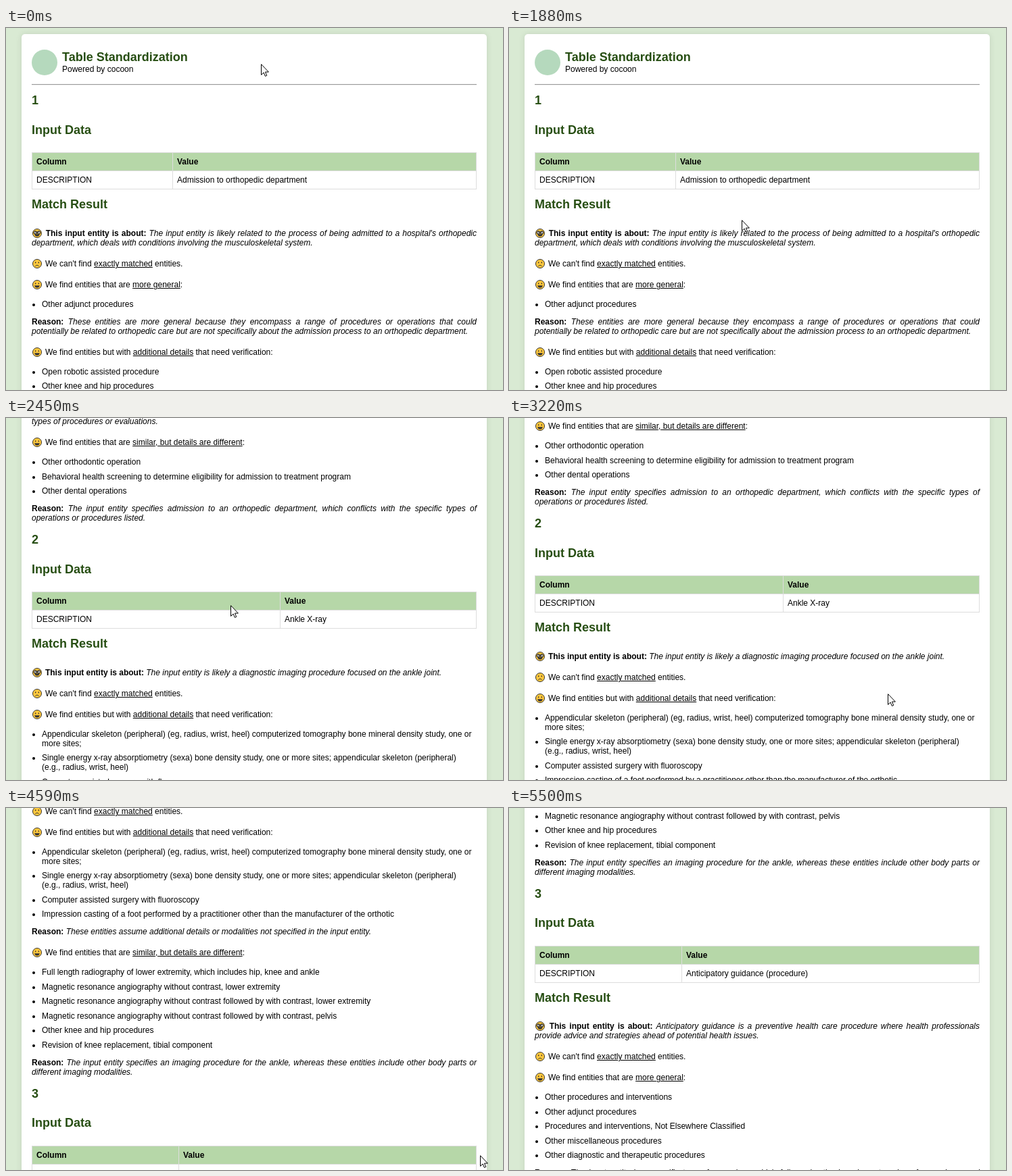
Write an HTML page that moves like this. It is 735 px wide and 536 px high and loops after 5.76 s.

```html
<!DOCTYPE html>
<html lang="en">
<head>
<meta charset="utf-8">
<title>Table Standardization</title>
<style>
  html, body { margin: 0; width: 100%; height: 100%; overflow: hidden; }
  body {
    position: relative; background: #d9ead3; color: #000;
    font: 12px/14px "Liberation Sans", Arial, sans-serif;
  }
  #doc { position: absolute; left: 0; top: 0; width: 735px; height: 2000px; }
  #card {
    position: absolute; left: 23px; top: 9px; width: 688px; height: 1980px;
    background: #fff; border-radius: 5px; box-shadow: 0 0 10px rgba(0, 0, 0, .1);
  }
  #logo {
    position: absolute; left: 38px; top: 32px; width: 38px; height: 38px;
    border-radius: 50%; background: #b5d9bd;
  }
  #rule {
    position: absolute; left: 38px; top: 83px; width: 658px; height: 1px;
    background: #9a9a9a; border-bottom: 1px solid #eee;
  }
  .text { position: absolute; left: 38px; width: 658px; text-align: justify; }
  .full { text-align-last: justify; }
  .head { position: absolute; left: 38px; font: bold 18px/20px "Liberation Sans", Arial, sans-serif; color: #274e13; white-space: nowrap; }
  .item { position: absolute; left: 53px; width: 643px; }
  .item::before {
    content: ""; position: absolute; left: -14px; top: 6px;
    width: 4px; height: 4px; border-radius: 50%; background: #000;
  }
  .cell { position: absolute; height: 14px; padding: 6px; border: 1px solid #ddd; box-sizing: content-box; }
  .th { background: #b6d7a8; font-weight: bold; }
  .hover { background: #f5f5f5; }
  .face { width: 16.6px; height: 14px; vertical-align: top; overflow: visible; }
  #cursor { position: absolute; left: 0; top: 0; width: 12px; height: 19px; }
</style>
</head>
<body>
<div id="doc">
  <div id="card"></div>
  <div id="logo"></div>
  <div id="rule"></div>
</div>
<svg id="cursor" viewBox="0 0 12 19">
  <path d="M.5 .7V16.4L4.1 13L6.4 18.4L8.7 17.4L6.5 12.1H11.4Z" fill="#fff" stroke="#000" stroke-width="1"/>
</svg>
<script>
const doc = document.getElementById("doc");
const cursor = document.getElementById("cursor");
const rows = [];

function add(cls, top, html, style = {}) {
  const el = document.createElement("div");
  el.className = cls;
  el.innerHTML = html;
  el.style.top = top + "px";
  Object.assign(el.style, style);
  doc.append(el);
  return el;
}

// y is the middle of the first line of text
const text = (y, html, cls = "") => add("text " + cls, y - 7, html);
const head = (y, html, left = 38) => add("head", y - 10, html, { left: left + "px" });
const reason = (y, html, cls) => text(y, `<b>Reason:</b> <i>${html}</i>`, cls);

function list(y, items) {
  for (const item of items) {
    const el = add("item", Math.floor(y) - 7, item);
    y += el.offsetHeight + 7.5;
  }
}

function table(top, split, value) {
  const cell = (cls, y, x, end, label) =>
    add("cell " + cls, y, label, { left: x + "px", width: end - x - 13 + "px" });
  cell("th", top, 38, split, "Column");
  cell("th", top, split, 695, "Value");
  const cells = [
    cell("", top + 27, 38, split, "DESCRIPTION"),
    cell("", top + 27, split, 695, value)
  ];
  rows.push({ top: top + 28, cells });
}

const eyes = '<ellipse cx="5.7" cy="5.3" rx=".8" ry="1.1"/><ellipse cx="10.3" cy="5.3" rx=".8" ry="1.1"/>';
const grin = '<path d="M4.2 8.2H11.8Q11.3 11.6 8 11.6T4.2 8.2Z"/>';
const frown = '<path d="M5.2 10.8Q8 7.6 10.8 10.8" fill="none" stroke="#333"/>';
const specs = '<g fill="#fff" stroke="#222" stroke-width="1.1"><circle cx="5.4" cy="5.8" r="2.1"/><circle cx="10.6" cy="5.8" r="2.1"/></g>';
const face = parts =>
  `<svg class="face" viewBox="0 0 16.6 14" fill="#333"><circle cx="8" cy="7" r="6.5" fill="#ffc83d" stroke="#333"/>${parts}</svg> `;

const about = (y, html) => text(y, face(specs + eyes + grin) + `<b>This input entity is about:</b> <i>${html}</i>`);
const none = y => text(y, face(eyes + frown) + "We can't find <u>exactly matched</u> entities.");
const found = (y, html) => text(y, face(eyes + grin) + "We find entities " + html);
const general = y => found(y, "that are <u>more general</u>:");
const detailed = y => found(y, "but with <u>additional details</u> that need verification:");
const similar = y => found(y, "that are <u>similar, but details are different</u>:");

head(43, "Table Standardization", 83);
add("text", 54, "Powered by cocoon", { left: "83px", width: "300px" });

head(107, "1");
head(151, "Input Data");
table(184, 246, "Admission to orthopedic department");
head(261, "Match Result");
about(304, "The input entity is likely related to the process of being admitted to a hospital's orthopedic department, which deals with conditions involving the musculoskeletal system.");
none(349);
general(380);
list(409, ["Other adjunct procedures"]);
reason(435, "These entities are more general because they encompass a range of procedures or operations that could potentially be related to orthopedic care but are not specifically about the admission process to an orthopedic department.");
detailed(480);
list(509, ["Open robotic assisted procedure", "Other knee and hip procedures"]);
reason(556, "These entities assume additional details about the admission that are not given in the input entity, such as", "full");
text(570, "<i>types of procedures or evaluations.</i>");
similar(601);
list(630.5, [
  "Other orthodontic operation",
  "Behavioral health screening to determine eligibility for admission to treatment program",
  "Other dental operations"
]);
reason(699, "The input entity specifies admission to an orthopedic department, which conflicts with the specific types of operations or procedures listed.");

head(745, "2");
head(789, "Input Data");
table(822, 405, "Ankle X-ray");
head(899, "Match Result");
about(942, "The input entity is likely a diagnostic imaging procedure focused on the ankle joint.");
none(973);
detailed(1004);
list(1033, [
  "Appendicular skeleton (peripheral) (eg, radius, wrist, heel) computerized tomography bone mineral density study, one or more sites;",
  "Single energy x-ray absorptiometry (sexa) bone density study, one or more sites; appendicular skeleton (peripheral) (e.g., radius, wrist, heel)",
  "Computer assisted surgery with fluoroscopy",
  "Impression casting of a foot performed by a practitioner other than the manufacturer of the orthotic"
]);
reason(1151, "These entities assume additional details or modalities not specified in the input entity.");
similar(1182);
list(1211.5, [
  "Full length radiography of lower extremity, which includes hip, knee and ankle",
  "Magnetic resonance angiography without contrast, lower extremity",
  "Magnetic resonance angiography without contrast followed by with contrast, lower extremity",
  "Magnetic resonance angiography without contrast followed by with contrast, pelvis",
  "Other knee and hip procedures",
  "Revision of knee replacement, tibial component"
]);
reason(1345, "The input entity specifies an imaging procedure for the ankle, whereas these entities include other body parts or different imaging modalities.");

head(1391, "3");
head(1434, "Input Data");
table(1468, 255, "Anticipatory guidance (procedure)");
head(1545, "Match Result");
about(1587, "Anticipatory guidance is a preventive health care procedure where health professionals provide advice and strategies ahead of potential health issues.");
none(1632);
general(1663);
list(1692.5, [
  "Other procedures and interventions",
  "Other adjunct procedures",
  "Procedures and interventions, Not Elsewhere Classified",
  "Other miscellaneous procedures",
  "Other diagnostic and therapeutic procedures"
]);
reason(1804, "The input entity is a specific type of procedure, which falls under the broader categories of procedures and", "full");

// time, scroll, pointer x, pointer y (no pointer when x is missing)
const steps = [
  [0, 0, 377, 53], [650, 0, 377, 56], [800, 0, 367, 112], [920, 0, 355, 177],
  [1070, 0, 355, 196], [1190, 0, 354, 208], [1340, 0, 353, 214], [1460, 0, 352, 219],
  [1610, 0, 349, 264], [1760, 0, 346, 277], [1880, 0, 344, 284],
  [2000, 120, 342, 283], [2150, 285, 338, 281], [2300, 423, 335, 279], [2450, 565, 332, 277],
  [2570, 581, 352, 304], [2720, 587, 408, 363], [2840, 589, 475, 426], [2960, 589, 524, 470],
  [3100, 589, 543, 438], [3220, 589, 560, 408],
  [3370, 606, 574, 418], [3490, 650, 604, 440], [3620, 697, 634, 462], [3740, 732, 656, 477],
  [3890, 785, 680, 492], [4010, 814, 697, 505], [4160, 814, 701, 514],
  [4590, 968, 701, 514], [4740, 1039, 701, 514],
  [4990, 1082, 701, 514], [5110, 1152, 701, 514], [5260, 1212, 711, 521],
  [5380, 1248], [5500, 1264]
];
const LOOP = 5760;
const start = performance.now();
let shown = null;

function draw(step) {
  const [, scroll, x, y] = step;
  doc.style.top = -scroll + "px";
  cursor.style.display = x === undefined ? "none" : "block";
  cursor.style.transform = `translate(${x || 0}px, ${y || 0}px)`;
  for (const { top, cells } of rows) {
    const over = y + scroll >= top && y + scroll < top + 26;
    cells.forEach(c => c.classList.toggle("hover", over));
  }
}

function tick(now) {
  const t = Math.max(0, now - start) % LOOP;
  const step = steps.findLast(s => s[0] <= t);
  if (step !== shown) draw(shown = step);
  requestAnimationFrame(tick);
}
draw(shown = steps[0]);
requestAnimationFrame(tick);
</script>
</body>
</html>
```
